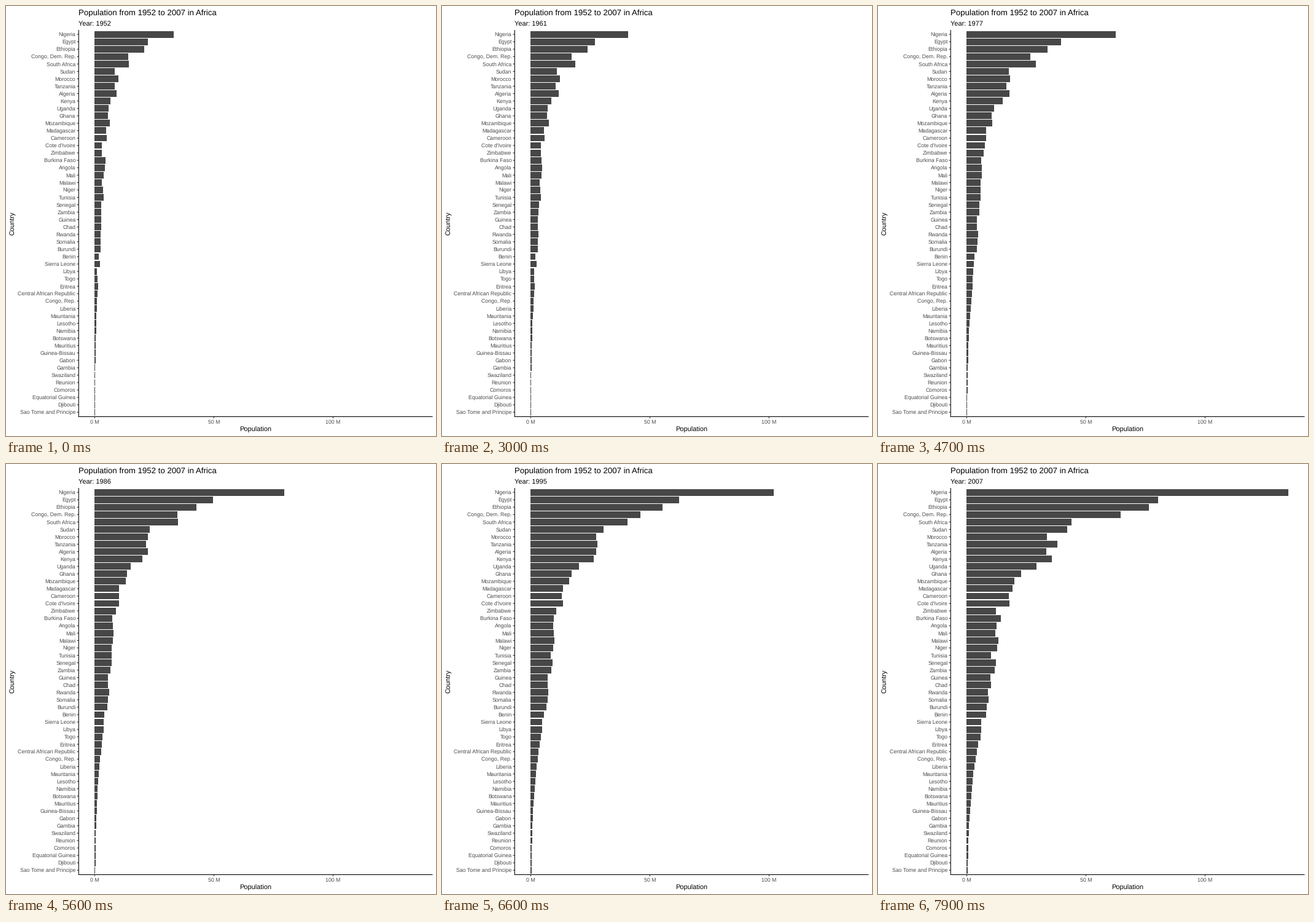
Write a matplotlib script that moves like this. It is 700 by 700 pixels and loops after 10 s.

```python
import math

import matplotlib.pyplot as plt
from matplotlib.animation import FuncAnimation
from matplotlib.patches import Rectangle

plt.rcParams["font.family"] = "Liberation Sans"
plt.rcParams["text.hinting"] = "none"

SIZE, DPI = 700, 100
PX = 72 / DPI                      # points per pixel
FRAMES, INTERVAL = 100, 100
HOLD, STEPS = 20, 59               # still frames at the start, then moving ones
FIRST, LAST = 1952, 2007

LEFT, RIGHT, TOP, BOTTOM = 118.3, 694.5, 39.0, 668.5
ZERO, PER_M = 144.4, 3.88
BAR_X, ROW0, PITCH = 144, 46.11, 12.062
BAR, INK, TICK, LABEL = "#474747", "black", "#333333", "#4d4d4d"

# Millions of people in the first and last year.
ENDS = {
    "Nigeria": (33.12, 135.03), "Egypt": (22.22, 80.26), "Ethiopia": (20.86, 76.51),
    "Congo, Dem. Rep.": (14.1, 64.61), "South Africa": (14.26, 44.0),
    "Sudan": (8.5, 42.29), "Morocco": (9.94, 33.76), "Tanzania": (8.32, 38.14),
    "Algeria": (9.28, 33.33), "Kenya": (6.47, 35.61), "Uganda": (5.82, 29.17),
    "Ghana": (5.58, 22.87), "Mozambique": (6.45, 19.95), "Madagascar": (4.76, 19.17),
    "Cameroon": (5.01, 17.7), "Cote d'Ivoire": (2.98, 18.01), "Zimbabwe": (3.08, 12.31),
    "Burkina Faso": (4.47, 14.33), "Angola": (4.23, 12.42), "Mali": (3.84, 12.03),
    "Malawi": (2.92, 13.33), "Niger": (3.38, 12.89), "Tunisia": (3.65, 10.28),
    "Senegal": (2.76, 12.27), "Zambia": (2.67, 11.75), "Guinea": (2.66, 9.95),
    "Chad": (2.68, 10.24), "Rwanda": (2.53, 8.86), "Somalia": (2.53, 9.12),
    "Burundi": (2.45, 8.39), "Benin": (1.74, 8.08), "Sierra Leone": (2.14, 6.14),
    "Libya": (1.02, 6.04), "Togo": (1.22, 5.7),
}
# The smallest countries fall off exponentially down the list.
SMALL = ["Eritrea", "Central African Republic", "Congo, Rep.", "Liberia", "Mauritania",
         "Lesotho", "Namibia", "Botswana", "Mauritius", "Guinea-Bissau", "Gabon",
         "Gambia", "Swaziland", "Reunion", "Comoros", "Equatorial Guinea", "Djibouti",
         "Sao Tome and Principe"]
for k, name in enumerate(SMALL):
    ENDS[name] = (1.44 * math.exp(-0.16 * k), 4.9 * math.exp(-0.14 * k))

# Growth that comes early (positive) or late (negative).
BOW = {
    "Ethiopia": -0.1, "Congo, Dem. Rep.": -0.05, "South Africa": 0.2, "Morocco": 0.05,
    "Algeria": 0.08, "Kenya": 0.07, "Uganda": -0.06, "Madagascar": -0.1,
    "Cameroon": -0.08, "Cote d'Ivoire": 0.13, "Zimbabwe": 0.2, "Burkina Faso": -0.23,
    "Angola": -0.1, "Niger": -0.08, "Guinea": -0.1, "Chad": -0.13, "Rwanda": 0.1,
    "Benin": -0.1, "Sierra Leone": -0.1, "Libya": 0.2,
}
SWAY = 0.03                        # slow start and quick finish shared by all


def population(name, u):
    a, b = ENDS[name]
    bend = BOW.get(name, 0) * 4 * u * (1 - u) - SWAY * math.sin(2 * math.pi * u)
    return a * (b / a) ** u * math.exp(bend)


fig = plt.figure(figsize=(SIZE / DPI, SIZE / DPI), dpi=DPI, facecolor="white")
ax = fig.add_axes([0, 0, 1, 1])
ax.set_xlim(0, SIZE)
ax.set_ylim(SIZE, 0)
ax.axis("off")


def text(x, y, s, size, color=INK, ha="left", **kw):
    return ax.text(x, y, s, fontsize=size * PX, color=color, ha=ha, va="baseline", **kw)


def line(xs, ys, color=INK):
    ax.plot(xs, ys, color=color, lw=1.07 * PX, solid_capstyle="butt", snap=False)


text(LEFT, 15, "Population from 1952 to 2007 in Africa", 13.2)
subtitle = text(LEFT, 31.4, "", 11)
text((LEFT + RIGHT) / 2, 692.4, "Population", 11, ha="center")
text(13.4, (TOP + BOTTOM) / 2, "Country", 11, ha="center",
     rotation=90, rotation_mode="anchor")

bars = {}
for i, name in enumerate(ENDS):
    y = ROW0 + i * PITCH
    top, bottom = round(y - 0.45 * PITCH), round(y + 0.45 * PITCH)
    bar = Rectangle((BAR_X, top), 1, bottom - top, fc=BAR, lw=0, antialiased=False)
    bars[name] = ax.add_patch(bar)
    line([LEFT - 2.75, LEFT], [y, y], TICK)
    text(LEFT - 4.95, y + 3.2, name, 8.8, LABEL, "right")

for millions in (0, 50, 100):
    x = ZERO + millions * PER_M
    line([x, x], [BOTTOM, BOTTOM + 2.75], TICK)
    text(x, 679.8, f"{millions} M", 8.8, LABEL, "center")

line([LEFT, LEFT], [TOP, BOTTOM + 0.5])
line([LEFT - 0.5, RIGHT], [BOTTOM, BOTTOM])


def update(n):
    u = min(max(n - HOLD, 0), STEPS) / STEPS
    for name, bar in bars.items():
        end = round(ZERO + PER_M * population(name, u))
        bar.set_width(max(1, end - BAR_X))
    subtitle.set_text(f"Year: {round(FIRST + (LAST - FIRST) * u)}")
    return [*bars.values(), subtitle]


anim = FuncAnimation(fig, update, frames=FRAMES, interval=INTERVAL,
                     init_func=lambda: update(0), repeat=True, repeat_delay=0, blit=False)
plt.show()
```
